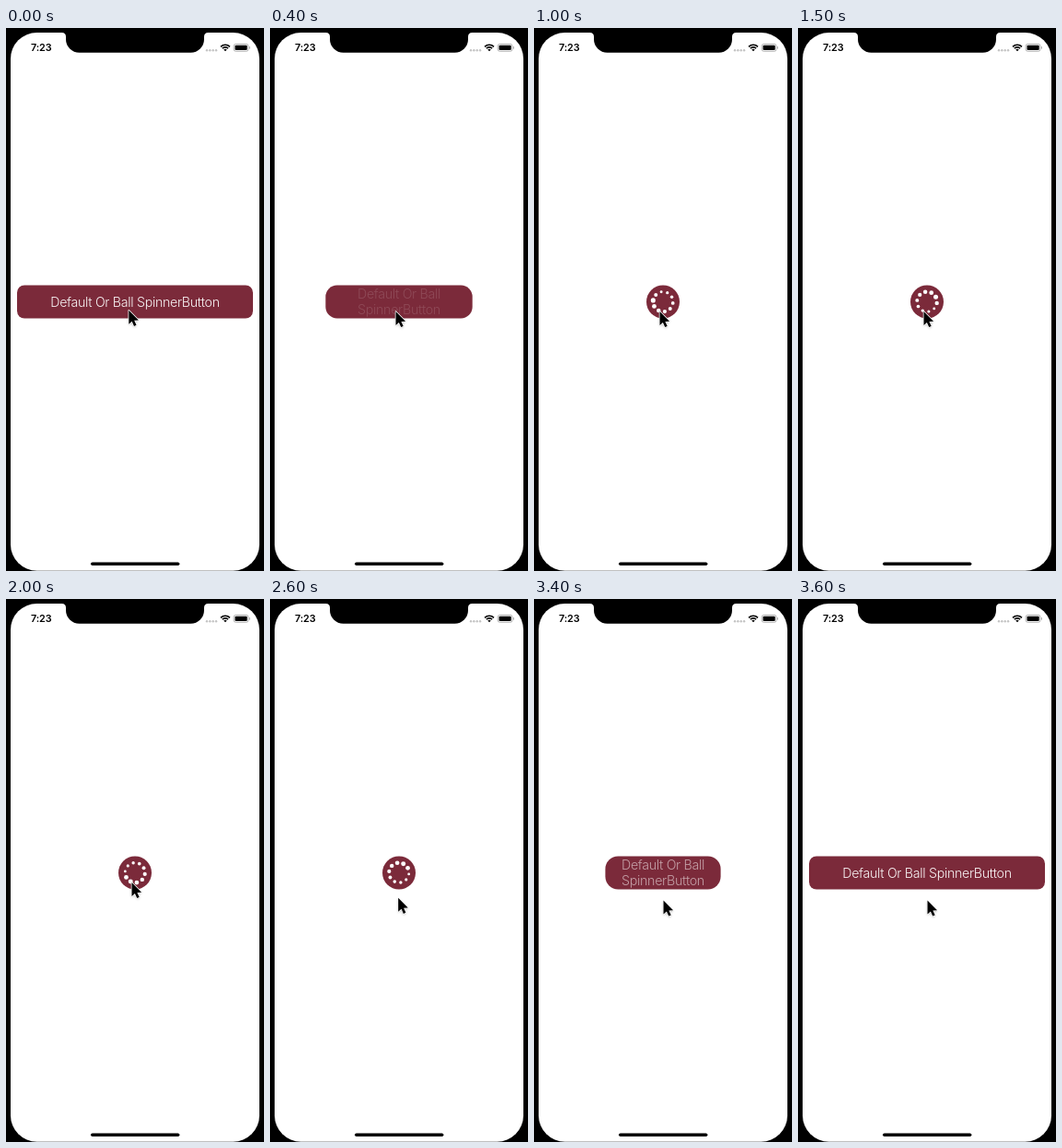
Write an HTML page with a canvas that moves like this. It is 280 px wide and 590 px high and loops after 4.2 s.

```html
<!DOCTYPE html>
<html lang="en">
<head>
<meta charset="utf-8">
<title>Spinner button</title>
<style>
  html, body { margin: 0; width: 100%; height: 100%; overflow: hidden; background: #000; }
  canvas { display: block; width: 280px; height: 590px; }
</style>
</head>
<body>
<canvas id="stage"></canvas>
<script>
const W = 280, H = 590, LOOP = 4200, STEP = 100, LAST = 3600;
const WINE = '#7b2a3a';
const FONT = 'Inter, "Open Sans", sans-serif';
const canvas = document.getElementById('stage');
const ctx = canvas.getContext('2d');
const dpr = window.devicePixelRatio || 1;
canvas.width = W * dpr;
canvas.height = H * dpr;

const clamp = x => Math.min(1, Math.max(0, x));
const ramp = (t, a, b) => clamp((t - a) / (b - a));
const ease = x => x * x * (3 - 2 * x);
const mix = (a, b, k) => a + (b - a) * k;

function box(x, y, w, h, r, fill) {
  ctx.fillStyle = fill;
  ctx.beginPath();
  ctx.roundRect(x, y, w, h, r);
  ctx.fill();
}

function dot(x, y, r, fill) {
  ctx.fillStyle = fill;
  ctx.beginPath();
  ctx.arc(x, y, r, 0, Math.PI * 2);
  ctx.fill();
}

function label(text, x, y, font, fill, align, spacing) {
  ctx.font = font + ' ' + FONT;
  ctx.letterSpacing = spacing + 'px';
  ctx.textAlign = align;
  ctx.textBaseline = 'alphabetic';
  ctx.fillStyle = fill;
  ctx.fillText(text, x, y);
}

function drawNotch() {
  ctx.fillStyle = '#000';
  ctx.beginPath();
  ctx.moveTo(60.5, 5);
  ctx.quadraticCurveTo(65, 5, 65, 9.5);
  ctx.arcTo(65, 26.7, 80, 26.7, 14.5);
  ctx.arcTo(215, 26.7, 215, 10, 14.5);
  ctx.lineTo(215, 9.5);
  ctx.quadraticCurveTo(215, 5, 219.5, 5);
  ctx.lineTo(219.5, 0);
  ctx.lineTo(60.5, 0);
  ctx.fill();
}

function drawWifi(x, y) {
  const a = Math.PI * 0.25;
  ctx.strokeStyle = '#000';
  ctx.lineWidth = 1.6;
  for (const r of [7, 4.4]) {
    ctx.beginPath();
    ctx.arc(x, y, r, -Math.PI / 2 - a, -Math.PI / 2 + a);
    ctx.stroke();
  }
  ctx.fillStyle = '#000';
  ctx.beginPath();
  ctx.moveTo(x, y);
  ctx.arc(x, y, 2.5, -Math.PI / 2 - a, -Math.PI / 2 + a);
  ctx.fill();
}

function drawPhone() {
  ctx.fillStyle = '#000';
  ctx.fillRect(0, 0, W, H);
  box(5, 5, 270, 584.7, 28.5, '#fff');
  drawNotch();
  label('7:23', 27, 25.4, '600 10.8px', '#000', 'left', -0.1);
  for (let i = 0; i < 4; i++) dot(218 + i * 3.35, 24.2, 1.2, '#c4c4c4');
  drawWifi(238, 25.3);
  ctx.strokeStyle = '#a0a0a0';
  ctx.lineWidth = 0.8;
  ctx.beginPath();
  ctx.roundRect(247.2, 17.4, 15.8, 7.9, 2.2);
  ctx.stroke();
  box(248.5, 18.7, 13.2, 5.3, 1.1, '#000');
  box(263.9, 20, 0.9, 2.7, 0.5, '#a0a0a0');
  box(92, 580.4, 96.4, 3.6, 1.8, '#000');
}

function drawButton(t) {
  const closed = t < 2000 ? ease(ramp(t, 230, 600)) : 1 - ease(ramp(t, 3245, 3600));
  const w = mix(256, 36, closed);
  box(140 - w / 2, 279.5, w, 36, mix(8, 18, closed), WINE);

  const alpha = t < 2000 ? 1 - ramp(t, 240, 430) : ramp(t, 3220, 3530);
  if (alpha <= 0) return;
  const fill = `rgba(255,255,255,${alpha * 0.95})`;
  const write = (s, y) => label(s, 140, y, '300 14.2px', fill, 'center', -0.3);
  if (w > 186) {
    write('Default Or Ball SpinnerButton', 303);
  } else {
    write('Default Or Ball', 294.3);
    write('SpinnerButton', 311.4);
  }
}

// Ten fixed balls; a swelling runs clockwise once every 1.2 s.
function drawSpinner(t) {
  if (t < 600 || t > 3200) return;
  const head = 8.5 + (t - 1000) / 120;
  for (let i = 0; i < 10; i++) {
    const lag = (((head - i) % 10) + 10) % 10;
    const size = lag < 9 ? 1 - lag / 9 : lag - 9;
    const a = (i * 36 - 100) * Math.PI / 180;
    dot(140 + 10.8 * Math.cos(a), 297.4 + 10.8 * Math.sin(a), mix(1.4, 2.6, size), '#fff');
  }
}

function cursorAt(t) {
  if (t < 2400) {
    const k = ramp(t, 0, 300);
    return [mix(133.3, 136.5, k), mix(306.8, 308, k)];
  }
  const k = ease(ramp(t, 2400, 2640));
  const drift = ramp(t, 2600, 2800);
  return [mix(136.5, 139.4, k) + drift * 1.1, mix(308, 326.2, k) + drift * 1.3];
}

function drawCursor(x, y) {
  const pts = [[0, 0], [0, 15], [3.4, 11.9], [5.7, 17.1], [8.2, 16], [5.9, 10.9], [10.6, 10.7]];
  ctx.save();
  ctx.translate(x, y);
  ctx.beginPath();
  pts.forEach(([px, py]) => ctx.lineTo(px, py));
  ctx.closePath();
  ctx.shadowColor = 'rgba(0,0,0,0.4)';
  ctx.shadowBlur = 2.5 * dpr;
  ctx.shadowOffsetY = dpr;
  ctx.fillStyle = '#fff';
  ctx.fill();
  ctx.shadowColor = 'transparent';
  ctx.lineJoin = 'round';
  ctx.lineWidth = 1.5;
  ctx.strokeStyle = '#fff';
  ctx.stroke();
  ctx.fillStyle = '#000';
  ctx.fill();
  ctx.restore();
}

function frame(now) {
  const t = Math.min(LAST, Math.floor((now % LOOP) / STEP) * STEP);
  ctx.setTransform(dpr, 0, 0, dpr, 0, 0);
  drawPhone();
  drawButton(t);
  drawSpinner(t);
  drawCursor(...cursorAt(t));
  requestAnimationFrame(frame);
}

let start = null;
requestAnimationFrame(function first(now) {
  start = now;
  const tick = n => frameAt(n - start);
  function frameAt(ms) {
    const t = Math.min(LAST, Math.floor((ms % LOOP) / STEP) * STEP);
    ctx.setTransform(dpr, 0, 0, dpr, 0, 0);
    drawPhone();
    drawButton(t);
    drawSpinner(t);
    drawCursor(...cursorAt(t));
    requestAnimationFrame(tick);
  }
  frameAt(0);
});
</script>
</body>
</html>
```
